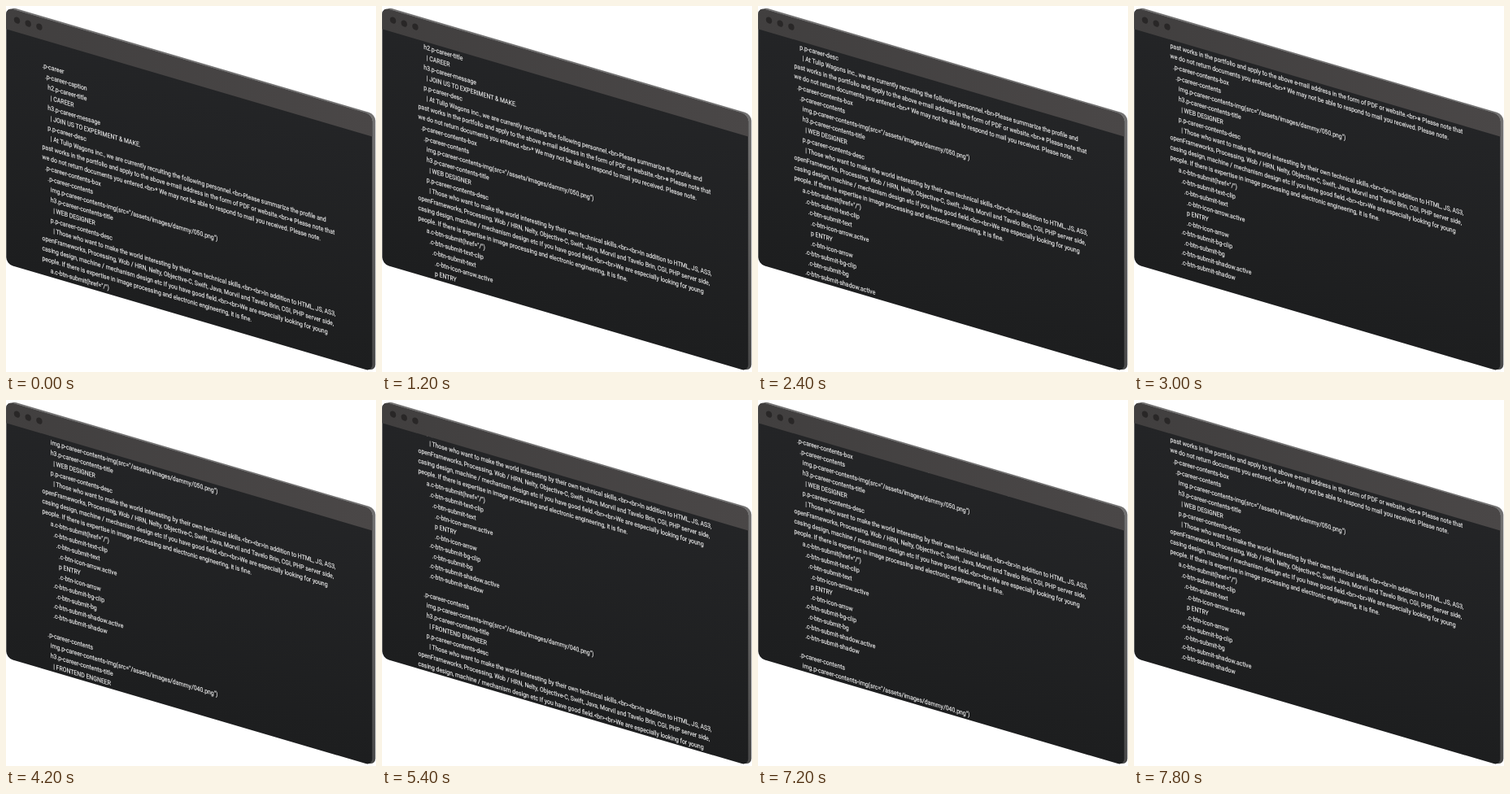
These frames come from a looping animation (455 by 450 pixels, 8 s). An HTML page:

```html
<!DOCTYPE html>
<html lang="en">
<head>
<meta charset="utf-8">
<title>Scrolling code window</title>
<style>
  html, body { margin: 0; width: 100%; height: 100%; overflow: hidden; background: #fff; }
  svg { display: block; width: 455px; height: 450px; }
  text {
    font: 8px Roboto, "Noto Sans CJK JP", "Noto Sans CJK", sans-serif;
    fill: #eee;
    stroke: #eee;
    stroke-width: .15px;
    white-space: pre;
    text-rendering: geometricPrecision;
  }
</style>
</head>
<body>
<svg viewBox="0 0 455 450">
  <defs>
    <linearGradient id="face" x2="0" y2="1">
      <stop stop-color="#242527"/>
      <stop offset="1" stop-color="#1d1e1f"/>
    </linearGradient>
    <linearGradient id="bar">
      <stop stop-color="#413f3f"/>
      <stop offset="1" stop-color="#4a4747"/>
    </linearGradient>
    <linearGradient id="edge" x2="0" y2="1">
      <stop stop-color="#737272"/>
      <stop offset="1" stop-color="#484848"/>
    </linearGradient>
    <clipPath id="window"><rect x=".3" y="1.7" width="450" height="315.3" rx="8"/></clipPath>
    <clipPath id="page"><rect x=".3" y="28.2" width="450" height="288.8"/></clipPath>
  </defs>
  <g transform="matrix(1 .294 0 1 0 0)">
    <rect x="4" y="-.5" width="450.3" height="316" rx="8" fill="url(#edge)"/>
    <g clip-path="url(#window)">
      <rect width="455" height="318" fill="url(#face)"/>
      <rect width="455" height="28.2" fill="url(#bar)"/>
      <g fill="#292727">
        <ellipse cx="13.5" cy="13.6" rx="3.7" ry="4"/>
        <ellipse cx="27.2" cy="13.6" rx="3.7" ry="4"/>
        <ellipse cx="40.9" cy="13.6" rx="3.7" ry="4"/>
      </g>
      <g clip-path="url(#page)"><g id="lines"></g></g>
    </g>
  </g>
</svg>
<script>
const LOOP = 8000, STEP = 600, PEAK = 9, STEP_HEIGHT = 24.8, LINE_HEIGHT = 12.48;

const job = (image, title) => `
    .p-career-contents
      img.p-career-contents-img(src="/assets/images/dammy/${image}.png")
      h3.p-career-contents-title
        | ${title}
      p.p-career-contents-desc
        | Those who want to make the world interesting by their own technical skills.<br><br>In addition to HTML, JS, AS3,
openFrameworks, Processing, Wob / HRN, Nelty, Objective-C, Swift, Java, Morvil and Tavelo Brin, CGI, PHP server side,
casing design, machine / mechanism design etc If you have good field.<br><br>We are especially looking for young
people. If there is expertise in image processing and electronic engineering, it is fine.
      a.c-btn-submit(href="/")
        .c-btn-submit-text-clip
          .c-btn-submit-text
            .c-btn-icon-arrow.active
            p ENTRY
            .c-btn-icon-arrow
        .c-btn-submit-bg-clip
          .c-btn-submit-bg
        .c-btn-submit-shadow.active
        .c-btn-submit-shadow
`;

const page = `.p-career
  .p-career-caption
    h2.p-career-title
      | CAREER
    h3.p-career-message
      | JOIN US TO EXPERIMENT & MAKE.
    p.p-career-desc
      | At Tulip Wagons inc., we are currently recruiting the following personnel.<br>Please summarize the profile and
past works in the portfolio and apply to the above e-mail address in the form of PDF or website.<br>※ Please note that
we do not return documents you entered.<br>* We may not be able to respond to mail you received. Please note.
  .p-career-contents-box${job("050", "WEB DESIGNER")}${job("040", "FRONTEND ENGNEER")}`;

const lines = document.getElementById("lines");
page.split("\n").forEach((line, i) => {
  const text = document.createElementNS("http://www.w3.org/2000/svg", "text");
  text.setAttribute("y", i * LINE_HEIGHT);
  text.textContent = line;
  lines.append(text);
});

// Scrolls down in steps until the peak, then back up
function draw() {
  const step = Math.floor(performance.now() % LOOP / STEP);
  const scroll = (PEAK - Math.abs(PEAK - step)) * STEP_HEIGHT;
  lines.setAttribute("transform", `translate(44.5 ${62.4 - scroll}) scale(.8625 1)`);
  requestAnimationFrame(draw);
}
draw();
</script>
</body>
</html>
```
